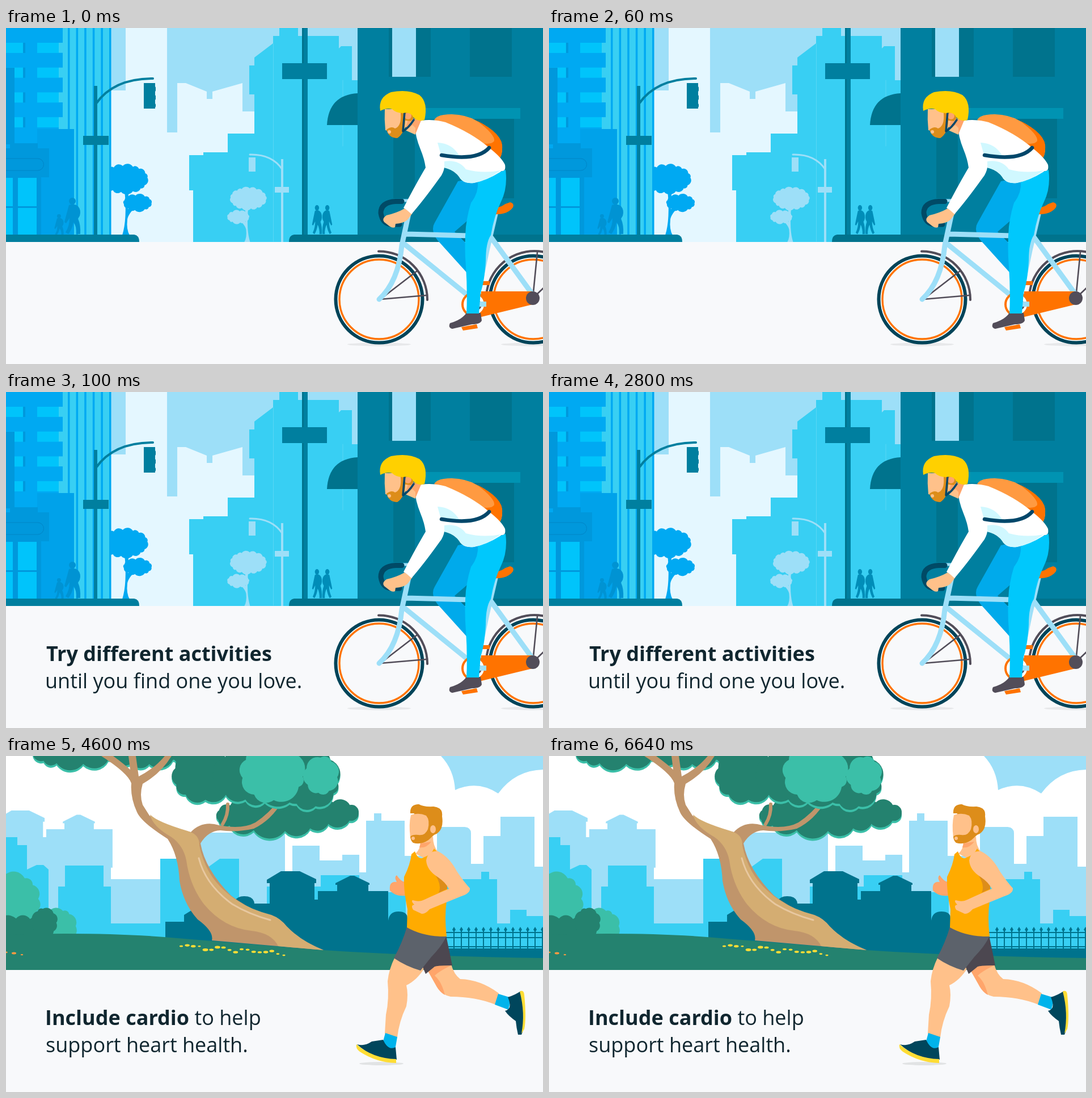
These frames come from a looping animation (947 by 592 pixels, 8 s). An HTML page:

```html
<!DOCTYPE html>
<html lang="en">
<head>
<meta charset="utf-8">
<title>Get active</title>
<style>
  html, body { margin: 0; width: 100%; height: 100%; overflow: hidden; background: #f8f9fb; }
  svg { display: block; width: 947px; height: 592px; }
  text { font: 36px "Open Sans", "Noto Sans", sans-serif; fill: #10262f; }
  .b { font-weight: 700; }
  .line { fill: none; stroke-linecap: round; stroke-linejoin: round; }
  .sky { fill: #9ddff8; } .pale { fill: #e4f7ff; } .cyan { fill: #38cff3; }
  .blue { fill: #00a9f2; } .deep { fill: #0098dc; } .glass { fill: #00c4fb; }
  .teal { fill: #007f9f; } .dark { fill: #00738d; } .ground { fill: #f8f9fb; }
  .skin { fill: #ffc18a; } .tan { fill: #ffa56b; } .hair { fill: #dd8d1a; }
  .orange { fill: #ff7300; } .grey { fill: #524d59; } .navy { fill: #00465c; } .yellow { fill: #ffdd35; }
  .leaf { fill: #24826f; } .mint { fill: #3bbfa8; } .bark { fill: #c0956b; } .wood { fill: #d4ad72; }
</style>
</head>
<body>
<svg viewBox="0 0 947 592">
<defs>
  <g id="wheel">
    <circle r="76" fill="#f8f9fb" stroke="#004459" stroke-width="7"/>
    <circle r="72" fill="none" stroke="#fff" stroke-width="3"/>
    <circle r="70" fill="none" stroke="#ff7300" stroke-width="3.4"/>
  </g>
  <!-- Leafy ellipses: data-crown is cx cy rx ry bumps. -->
  <g id="tree">
    <path d="M-7 0Q2 -28 -3 -80H4Q4 -55 3 -46L22 -60L25 -57Q4 -40 2 -28Q0 -10 6 0Z"/>
    <path data-crown="-3 -99 43 25 15"/>
    <path data-crown="20 -57 26 14 11"/>
  </g>
  <g id="walker">
    <circle cx="-1" cy="6" r="6"/>
    <path d="M-7 13Q2 9 9 15Q15 22 12 32L9 37Q14 48 13 64H6Q7 52 1 43Q-1 55 -8 64L-13 61Q-6 50 -6 36L-12 45L-15 43Q-10 24 -7 13Z"/>
  </g>
  <path id="houses" d="M460 218L485 203H518L547 217V224H544V253H550V238H584V227H581V224L607 211H614L641 224V227H639V238H674V310H465V224H460Z"/>
  <g id="topLeaves">
    <path data-crown="350 34 57 47 9"/>
    <path data-crown="455 34 95 50 13"/>
    <path data-crown="535 40 53 54 9"/>
  </g>
  <g id="lowLeaves">
    <path data-crown="475 105 112 30 13"/>
    <path data-crown="575 100 50 20 8"/>
  </g>
  <g id="leftLeaves">
    <path data-crown="120 -4 78 20 10"/>
    <path data-crown="245 -4 64 20 9"/>
    <path data-crown="318 -5 35 15 6"/>
  </g>
</defs>

<g id="ride">
  <path class="pale" d="M0 0H947V377H0Z"/>
  <path class="sky" d="M185 0H211V110H185ZM284 0H620V200H438V147H417V97L364 112V125H354V112L317 97H302V184H284Z"/>
  <path class="cyan" d="M330 377V286H323V224H348V219H391V186H438V117H429V66H438V52L471 27V14H482V0H515V14H587V36L591 32H610V92H620V377Z"/>
  <path class="line" stroke="#58d7f5" d="M471.500 28V376M594 92V208"/>
  <use href="#tree" x="212" y="365" class="blue"/>
  <use href="#tree" transform="translate(425 377) scale(-.774 .774)" class="sky"/>

  <g id="tower"></g>
  <path class="deep" d="M0 70H15V205H0Z"/>
  <path fill="#00a2ea" d="M55 178H120V377H55Z"/>
  <path class="deep" d="M0 212H7V203H56V212H76V263H62V377H0Z"/>
  <path class="line" stroke="#0085c6" d="M0 230H56a10.500 10.500 0 0 1 0 21H0"/>
  <path class="glass" d="M0 264H12V364H0ZM21 264H54V364H21Z"/>
  <path class="deep" d="M0 314H54V317H0Z"/>
  <g fill="#0093d3">
    <use href="#walker" x="118" y="299"/>
    <use href="#walker" transform="translate(94 328) scale(.58)"/>
  </g>

  <g class="teal">
    <path d="M155 102h6V364h-6ZM136 190H181V206H136ZM243 97H263V142H243Z"/>
    <path class="line" stroke="#007f9f" stroke-width="4" d="M159 133Q190 89 259 89"/>
    <path class="line" stroke="#007f9f" stroke-width="4" stroke-dasharray="5 10" d="M262 105V138"/>
    <path class="sky" d="M485 231h4V377h-4ZM474 280H499V290H474ZM428 228H440V253H428Z"/>
    <path class="line" stroke="#9ddff8" stroke-width="3" d="M487 249Q469 222 430 223"/>
    <path d="M0 364H226Q235 365 235 377H0Z"/>
    <path d="M620 0H947V377H620Z"/>
    <path d="M522 0H532V364H522Z"/>
  </g>
  <path class="dark" d="M522 0H525V364H522ZM566 171Q569 118 620 115V171ZM675 0H749V86H675ZM818 0H892V86H818ZM683 160H721V300H683ZM820 160H896V300H820ZM499 377Q499 365 508 364H947V377Z"/>
  <path class="teal" d="M487 62H566V90H487Z"/>
  <path class="sky" d="M681 0H723V86H681Z"/>
  <path fill="#0093b2" d="M729 141H907V160H729Z"/>
  <g fill="#008db8">
    <use href="#walker" transform="translate(549 312) scale(.62 .8)"/>
    <use href="#walker" transform="translate(566 312) scale(-.62 .8)"/>
  </g>
  <path class="ground" d="M0 377H947V592H0Z"/>

  <g fill="#e7e8ea"><ellipse cx="658" cy="557.500" rx="56" ry="3"/><ellipse cx="929" cy="557.500" rx="56" ry="3"/></g>
  <use href="#wheel" x="658" y="478"/>
  <use href="#wheel" x="930" y="478"/>
  <g class="line" stroke="#524d59" stroke-width="4">
    <path d="M657 393.500A85 85 0 0 1 743 479M848 463A85 85 0 0 1 950 395"/>
    <path stroke-width="2.600" d="M660 478L725 428M660 478L741 471M929 476L937 395M929 476L950 456"/>
  </g>
  <path class="orange" d="M838 446H853V453H838Z"/>
  <path fill="#00aaeb" d="M797 270L756 343Q748 356 761 374L818 437L832 400L791 359L834 322L842 262Z"/>
  <g class="line" stroke="#9ddff8" stroke-width="9">
    <path d="M712 318L698 383Q692 447 658 478M706 363L852 367M703 381L823 478M863 328L848 392L828 487M854 367L929 470"/>
    <path d="M701 304H712" stroke-width="5"/>
  </g>
  <path class="orange" d="M838 464H929V487L834 510Z"/>
  <circle cx="825" cy="487" r="20" fill="#fff" stroke="#ff7300" stroke-width="4"/>
  <circle cx="830" cy="488" r="9" class="grey"/>
  <path class="sky" d="M834 482H847V491H834Z"/>
  <circle cx="929" cy="476" r="12" class="grey"/>
  <path class="orange" d="M858 328Q860 317 874 314Q881 309 889 307Q897 309 894 316Q884 330 858 328Z"/>
  <path class="orange" d="M803 527L830 522L832 529L806 533Z"/>
  <path class="grey" d="M812 502H837L839 515Q837 522 822 522L787 530Q779 528 783 520Q804 514 812 502Z"/>
  <path fill="#00c8fc" d="M819 272L881 250Q885 282 873 306Q861 330 855 365Q846 378 846 410Q844 446 837 466L834 503H812Q814 465 811 420Q808 387 811 350Q815 320 823 300Z"/>
  <path fill="#00aaeb" d="M816 270H832Q834 289 821 307Z"/>
  <path class="line" stroke="#004a66" stroke-width="9" d="M698 305.500H687Q661 307 661 326Q664 345 680 346H694"/>
  <path class="skin" d="M703 318Q689 326 671 330Q662 336 667 342L676 349Q681 353 686 351L687 345Q701 344 708 338L717 326Z"/>

  <path fill="#ff9a41" d="M755 162Q760 152 786 152Q812 153 829 163Q867 184 875 207Q876 226 868 233Q829 199 755 162Z"/>
  <path class="orange" d="M830 163Q878 187 875 212Q875 227 867 233L833 202Q856 207 861 199Q863 188 830 163Z"/>
  <path fill="#fff" d="M722 166Q744 158 775 166Q822 185 852 211Q874 228 880 241Q882 253 874 252Q850 268 825 273Q806 275 799 262Q790 250 773 246Q771 257 764 265Q736 304 715 328Q707 320 701 317Q721 278 740 246Q738 231 731 214Q719 184 722 166Z"/>
  <path fill="#d0f8ff" d="M761 202Q787 203 800 226L768 227ZM773 235Q798 231 811 249Q840 257 872 251Q849 269 825 273Q806 275 799 262Q790 250 773 246Z"/>
  <path class="line" stroke="#00476a" stroke-width="6.500" d="M768 224Q831 235 852 211"/>

  <path class="tan" d="M704 174L710 157L732 163L722 187Z"/>
  <path class="skin" d="M668 143H708V165Q705 181 690 185L669 180Q667 161 668 143ZM704 180L717 171L722 176V188Z"/>
  <path class="hair" d="M696 148H717Q723 156 714 164L704 163Q704 185 690 194Q675 194 671 179Q680 172 686 177Q698 173 696 150Z"/>
  <circle cx="709" cy="155" r="6" class="tan"/>
  <circle cx="676" cy="183" r="3" class="skin"/>
  <path class="line" stroke="#00476a" stroke-width="3.500" d="M703 148L700 182Q710 176 719 162"/>
  <path fill="#ffd000" d="M660 146Q656 122 679 113Q709 107 729 118Q745 131 738 162Q727 166 718 157Q713 147 700 150Q688 150 681 143Q672 140 660 146Z"/>

  <g id="rideText">
    <text x="71" y="474" class="b">Try different activities</text>
    <text x="69" y="522">until you find one you love.</text>
  </g>
</g>

<g id="run">
  <path fill="#fff" d="M0 0H947V377H0Z"/>
  <path class="sky" d="M767 0Q790 24 792 60Q831 42 868 66Q898 25 947 24V0Z"/>
  <use href="#houses" class="sky" transform="translate(-447.700 -95.500) scale(.943)"/>
  <path class="sky" d="M0 180H185V217H300V135H492V210H505V158H553V184H593V174H623V205H635V114H649V101H662V114H703V176H760V125H809Q820 126 820 136V190H842V141H872V107H932V195H947V340H0Z"/>
  <path class="cyan" d="M0 143H20V157H37V200L54 192H66L75 200V316H92V230H104V193H172V230H185V295H272V181H320V222L377 181H411V260H460V230H555V210H623V240H705V290H775V217H838V204H852V217H866V295H889V271H918V282H947V345H0Z"/>
  <g class="dark">
    <use href="#houses"/>
    <path d="M281 330V292H314V280L340 264H400Q403 247 420 247T438 260H465V290H674Q676 274 692 274T708 286L730 292V339H947V360H281Z"/>
  </g>
  <g id="fence" stroke="#00738d" stroke-width="2"></g>
  <g class="mint">
    <path data-crown="8 255 52 50 11"/>
    <path data-crown="90 301 35 32 9"/>
  </g>
  <g class="leaf">
    <path data-crown="25 310 62 26 11"/>
    <path data-crown="68 292 22 25 8"/>
    <path d="M0 315Q45 313 104 313Q225 313 315 322L560 342Q728 353 947 356V377H0Z"/>
  </g>
  <g id="flowers"></g>

  <use href="#leftLeaves" y="4" class="mint"/>
  <use href="#leftLeaves" class="leaf"/>
  <use href="#lowLeaves" y="4" class="mint"/>
  <use href="#lowLeaves" class="leaf"/>
  <path class="bark" d="M168 0H189Q208 14 219 24L216 0H229L234 36Q263 21 280 0H292Q273 31 241 49Q235 69 241 86L253 105Q293 130 326 134Q346 113 376 122Q416 130 440 117Q464 101 481 78L487 80Q468 113 437 128Q406 135 378 131Q356 132 343 154Q351 200 397 246Q433 273 476 287Q500 317 560 342L363 325Q367 309 338 288Q313 261 306 220Q304 175 285 146Q239 117 231 99Q219 73 221 48Q215 30 168 0Z"/>
  <path class="wood" d="M254 103Q266 116 320 132Q342 138 341 158Q351 207 386 238Q417 267 468 280Q484 286 495 300Q520 326 560 342L480 335Q469 312 433 308Q384 303 349 261Q324 228 318 184Q313 158 292 143Q258 124 254 103Z"/>
  <path class="line" stroke="#e8c8a0" stroke-width="3" d="M340 180Q352 227 399 261Q429 279 466 289"/>
  <path class="line" stroke="#c0956b" stroke-width="6" d="M382 120Q392 104 391 85"/>
  <use href="#topLeaves" y="4" class="mint"/>
  <use href="#topLeaves" class="leaf"/>
  <g class="mint">
    <path data-crown="470 30 57 52 9"/>
    <path data-crown="556 34 30 34 7"/>
  </g>

  <path class="ground" d="M0 377H947V592H0Z"/>
  <ellipse cx="662" cy="542" rx="39" ry="3" fill="#e1e3e4"/>

  <path class="tan" d="M689 210Q684 213 689 222Q675 220 677 237Q687 248 704 246V222Q697 222 689 210Z"/>
  <path class="skin" d="M738 368L785 367Q790 385 801 393Q837 394 869 418L863 438Q828 424 784 424Q769 421 760 407Z"/>
  <path class="tan" d="M738 368L785 369Q764 379 756 387Q768 397 774 421Q766 417 760 407Z"/>
  <path fill="#00b3eb" d="M868 419L891 426L886 447L862 438Z"/>
  <path class="navy" d="M885 425Q898 421 908 414L914 445Q917 474 909 491H903Q900 478 899 467Q886 458 880 449Q894 446 885 425Z"/>
  <path class="yellow" d="M906 415Q913 411 914 421Q918 462 914 481L909 489Q916 453 906 415Z"/>
  <path class="skin" d="M686 354Q675 376 673 397Q676 428 670 456L668 489L690 496Q693 468 706 441Q710 420 706 404Q725 395 739 372Z"/>
  <path fill="#00b3eb" d="M669 488L690 495L686 518L663 510Z"/>
  <path class="navy" d="M619 508Q632 512 645 503L665 500Q674 520 687 513L689 535Q648 535 619 508Z"/>
  <path class="yellow" d="M618 508Q647 533 688 534V541Q653 540 624 521Q616 515 618 508Z"/>
  <path fill="#4c4750" d="M776 316L787 369Q761 369 756 371L740 384L730 360Z"/>
  <path fill="#5c626b" d="M707 301L777 317Q768 336 750 354L731 378Q706 371 684 356Q699 329 707 301Z"/>
  <path class="skin" d="M731 150L753 142Q753 159 762 169L740 181L722 172Q731 164 731 150Z"/>
  <path class="tan" d="M731 154L750 151Q741 163 729 161Z"/>
  <path fill="#ffab00" d="M721 168Q727 184 736 179Q750 174 755 163L765 175Q782 208 777 255Q773 284 777 318Q737 319 707 302L708 270Q701 238 702 213Q713 191 715 173Z"/>
  <path class="hair" d="M748 198Q773 211 778 218V234L763 241Q771 224 748 198Z"/>
  <path class="skin" d="M741 184Q744 166 762 168Q782 178 795 203Q807 221 818 233Q819 242 803 247L747 270Q739 279 733 278L718 271Q713 263 720 262Q714 256 717 254Q729 258 738 253Q759 243 781 234Q775 222 761 213Q742 201 741 184Z"/>
  <path class="hair" d="M713 101Q712 85 728 85Q736 90 754 89Q771 91 769 106Q773 133 755 139L745 148Q732 157 718 153Q712 148 713 137L720 101Z"/>
  <path class="skin" d="M714 104Q728 99 741 105Q748 113 744 129Q739 141 727 139Q717 138 713 142Q710 121 714 104Z"/>
  <ellipse cx="753" cy="129" rx="5" ry="7" class="skin"/>
  <circle cx="718" cy="145" r="3" class="skin"/>

  <text x="69" y="474"><tspan class="b">Include cardio</tspan> to help</text>
  <text x="70" y="522">support heart health.</text>
</g>
</svg>
<script>
const $ = id => document.getElementById(id);
const repeat = (count, draw) => Array.from({ length: count }, (_, i) => draw(i)).join("");
const rect = (x, y, w, h, cls) => `<rect x="${x}" y="${y}" width="${w}" height="${h}" class="${cls}"/>`;

let seed = 7;
const random = (lo, hi) => {
  seed = seed * 16807 % 2147483647;
  return lo + (hi - lo) * seed / 2147483647;
};

// Leafy outline: outward arcs between jittered points of an ellipse.
function crownPath(cx, cy, rx, ry, bumps) {
  const points = Array.from({ length: bumps }, (_, i) => {
    const angle = (i + random(-0.25, 0.25)) / bumps * 2 * Math.PI;
    return [cx + rx * 0.94 * Math.cos(angle), cy + ry * 0.92 * Math.sin(angle)];
  });
  const arcs = points.map(([x, y], i) => {
    const [px, py] = points.at(i - 1);
    const r = Math.hypot(x - px, y - py) * 0.62;
    return `A${r} ${r} 0 0 1 ${x} ${y}`;
  });
  return `M${points.at(-1)}${arcs.join("")}Z`;
}
for (const path of document.querySelectorAll("[data-crown]")) {
  path.setAttribute("d", crownPath(...path.dataset.crown.split(" ").map(Number)));
}

$("tower").innerHTML = rect(93, 0, 92, 377, "cyan") + rect(0, 0, 93, 377, "blue") +
  repeat(6, i => rect(109 + i * 14.6, 0, 3.5, 377, "blue")) +
  repeat(4, i => {
    const y = 26 + i * 43.7;
    return rect(93, y - 26, 7, 26, "blue") + rect(55, y, 38, 18, "glass") +
      rect(0, y, 30, 18, "glass") + rect(30, y, 4, 18, "deep");
  });

$("fence").innerHTML = `<path d="M775 311H947M775 320H947M775 336H947"/>` + repeat(13, i => {
  const x = 790 + i * 13;
  return `<path d="M${x} 304V340"/><path class="dark" stroke="none" d="M${x} 301l3 5-3 4-3-4Z"/>`;
});

const flowers = (count, x0, x1, y, slope, fill) => repeat(count, i => {
  const x = x0 + (x1 - x0) * i / (count - 1), r = random(2, 5);
  return `<ellipse cx="${x}" cy="${y + slope * i + random(-4, 4)}" rx="${r}" ry="${r / 2}" fill="${fill}"/>`;
});
$("flowers").innerHTML = flowers(18, 309, 490, 334, 0.9, "#ffdd35") + flowers(3, 0, 28, 348, 0, "#ff9a41");

const LOOP = 8000, TEXT_IN = 100, RUN_IN = 4600;
const show = (id, on) => { $(id).style.display = on ? "" : "none"; };
const start = performance.now();
function frame() {
  const t = (performance.now() - start) % LOOP;
  show("ride", t < RUN_IN);
  show("rideText", t >= TEXT_IN);
  show("run", t >= RUN_IN);
  requestAnimationFrame(frame);
}
frame();
</script>
</body>
</html>
```
